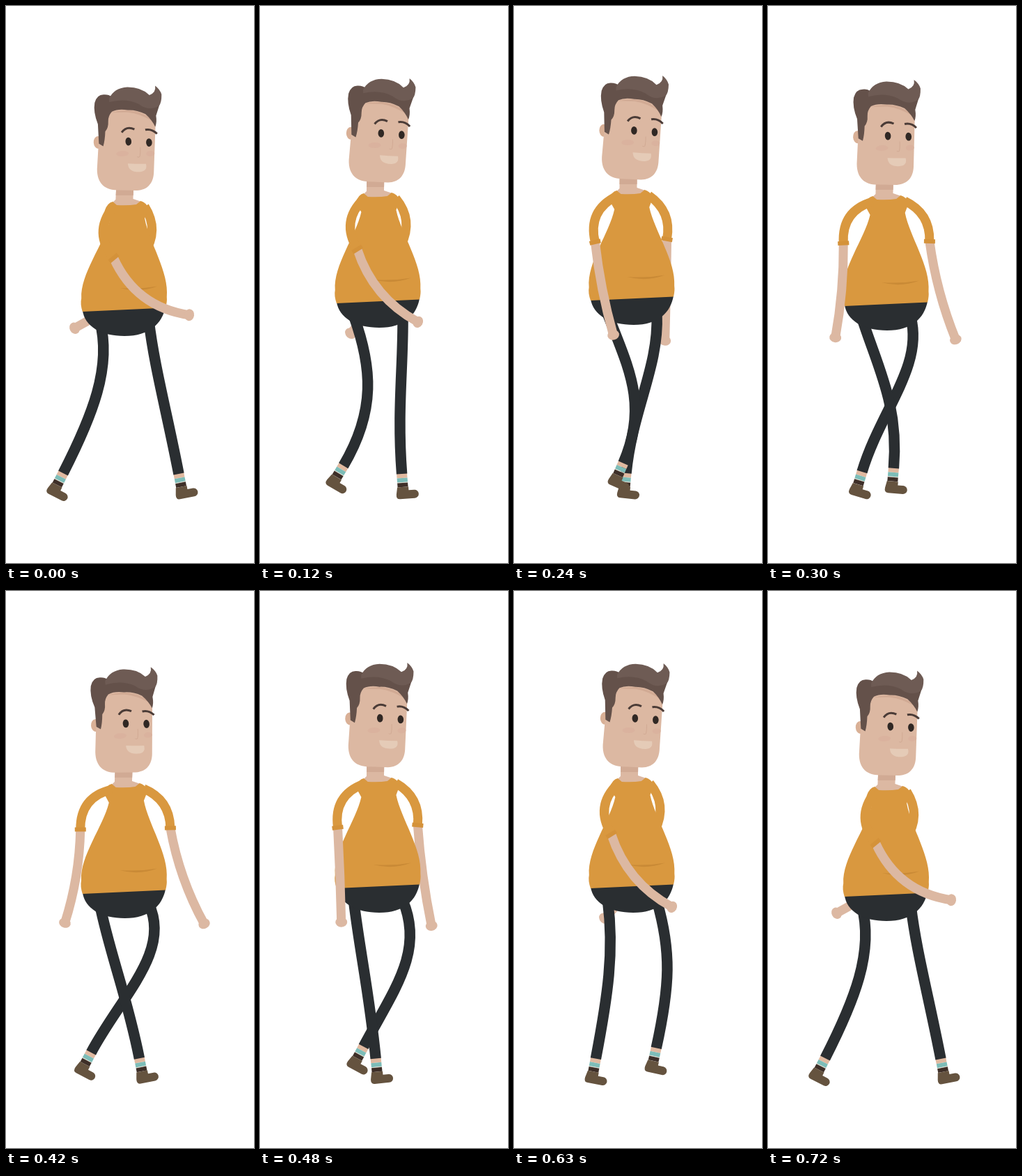
An HTML page with a canvas for the animation above (0.75 s loop, 356 by 800 pixels).

```html
<!DOCTYPE html>
<html lang="en">
<head>
<meta charset="utf-8">
<title>Walk cycle</title>
<style>
html, body { margin: 0; height: 100%; overflow: hidden; background: #fff; }
canvas { display: block; }
</style>
</head>
<body>
<canvas id="stage" width="356" height="800"></canvas>
<script>
const ctx = document.getElementById('stage').getContext('2d');
const LOOP = 750, STEP = 30, BEAT = 180;
const SKIN = '#dcb8a2', SHADE = '#d1aa94', SHIRT = '#d9983f', PANTS = '#2a2e31',
      SHOE = '#65533f', HAIR = '#6e5b54', HAIR_DARK = '#64514a', INK = '#302824';

// Per beat of the walk: ankle x, ankle y, foot angle, knee push
const NEAR_LEG = [[82, 671, 27, 18], [145, 653, 33, 32], [204, 671, -14, 16], [141, 672, 0, 4]];
const FAR_LEG = [[248, 672, -11, 8], [174, 672, 0, -4], [109, 667, 28, 33], [175, 646, 28, 30]];

const rad = degrees => degrees * Math.PI / 180;

function fill(color, d) {
  ctx.fillStyle = color;
  ctx.fill(new Path2D(d));
}

function line(color, width, d) {
  ctx.strokeStyle = color;
  ctx.lineWidth = width;
  ctx.stroke(new Path2D(d));
}

function oval(color, x, y, rx, ry, turn = 0) {
  ctx.fillStyle = color;
  ctx.beginPath();
  ctx.ellipse(x, y, rx, ry, turn, 0, 2 * Math.PI);
  ctx.fill();
}

function placed(x, y, degrees, draw) {
  ctx.save();
  ctx.translate(x, y);
  ctx.rotate(rad(degrees));
  draw();
  ctx.restore();
}

function band(color, top, bottom) {
  ctx.fillStyle = color;
  ctx.fillRect(-7.5, top, 15, bottom - top);
}

function drawFoot() {
  band('#e0b9a0', -1, 6);
  band('#7dbdb8', 6, 12);
  band('#d8d6c8', 12, 13);
  band('#3e2f28', 13, 19);
  fill(SHOE, 'M-8 19H8V24H16A6 6 0 0 1 16 36H-5Q-11 36 -10 29Z');
}

// The shin runs straight up from the foot; the knee push bends the thigh.
function drawLeg(hip, drop, poses, phase) {
  const beat = Math.floor(phase), next = poses[(beat + 1) % 4];
  const [x, y, angle, push] = poses[beat % 4].map((v, i) => v + (next[i] - v) * (phase - beat));
  const shinX = x + 92 * Math.sin(rad(angle)), shinY = y - 92 * Math.cos(rad(angle));
  placed(x, y, angle, drawFoot);
  line(PANTS, 15.5, `M${hip} ${440 + drop * .6}C${hip + push} 518 ${shinX} ${shinY} ${x} ${y}`);
}

// A bowed segment hanging at an angle from a joint
function segment(x, y, length, degrees, bow) {
  const sin = Math.sin(rad(degrees)), cos = Math.cos(rad(degrees));
  const endX = x - length * sin, endY = y + length * cos;
  const bendX = (x + endX) / 2 - bow * cos, bendY = (y + endY) / 2 - bow * sin;
  return {
    endX, endY,
    path: `M${x} ${y}Q${bendX} ${bendY} ${endX} ${endY}`,
    turn: Math.atan2(endY - bendY, endX - bendX),
  };
}

function drawArm(x, y, sleeveLength, sleeveAngle, sleeveBow, armLength, armAngle, armBow) {
  const sleeve = segment(x, y, sleeveLength, sleeveAngle, sleeveBow);
  const arm = segment(sleeve.endX, sleeve.endY, armLength, armAngle, armBow);
  line(SKIN, 13, arm.path);
  oval(SKIN, arm.endX, arm.endY, 7, 8.5, arm.turn);
  line(SHIRT, 13, sleeve.path);
  placed(sleeve.endX, sleeve.endY, sleeve.turn * 180 / Math.PI, () => line('#d4923a', 6, 'M0 -8V8'));
}

function drawTorso() {
  fill(PANTS, 'M110 417L229 412C225 436 208 454 172 454C138 454 114 440 110 417Z');
  fill(SKIN, 'M150 230H175V257L187 261L182 268H150L145 263L150 258Z');
  fill(SHADE, 'M150 230H175V252H150Z');
  fill(SHIRT, 'M146 261L152 266Q168 267 180 265L186 260Q194 262 198 271L193 285' +
    'C201 320 232 362 230 398Q231 405 229 413.5L110 419Q106 408 107.5 400' +
    'C104 365 136 322 143 288L135 274Q138 263 146 261Z');
  fill('#c98a36', 'M162 385Q190 387 216 382.5Q190 392.5 162 385Z');
}

function drawHead() {
  oval('#d9b096', 129, 174, 6.5, 9);
  fill(SKIN, 'M134 135L125.5 212C124 235 138 244 155 244L181 246C197 246 205 236 206.5 222' +
    'L213 148L205 130L150 125Z');
  oval('#dab29e', 163, 192, 9, 4);
  oval('#dab29e', 203, 194, 6, 4);
  fill(SHADE, 'M150 132Q190 124 212 150Q192 136 174 133Z');
  fill(HAIR_DARK, 'M136 180L130 176L130 148Q124 130 127 117Q131 105 141 106Q148 106 152 110L205 118' +
    'L220 124L214 140Q215 150 212 156Q208 146 199 137Q186 130 174 130Q160 127 151 131' +
    'Q145 137 145 145Q145 154 140 159Q139 171 136 180Z');
  fill(HAIR, 'M148 112Q156 97 175 97Q195 98 206 110Q216 107 215 97Q222 103 223.5 110' +
    'Q223 122 219 126Q204 134 190 122Q172 112 148 117Z');
  oval(INK, 172.5, 175, 4.3, 5.9);
  oval(INK, 202, 178, 4.3, 5.9);
  line('#4b3c37', 3, 'M163.5 161.5Q171 152 182 158M197.5 159.5Q207 158 214 166');
  line(SHADE, 1, 'M189 184Q189 193 187.5 197.5Q186 199 184 197.5');
  fill('#e5cbb7', 'M170 206.5Q183 208 196 208.5Q198 219 187 219.5Q170 219.5 170 206.5Z');
}

function draw(time) {
  // Each beat holds its key pose for one step, then moves on evenly.
  const phase = Math.floor(time / BEAT) + Math.max(0, time % BEAT - STEP) / (BEAT - STEP);
  const stride = Math.abs(2 - phase) - 1;
  const swing = Math.cos(phase * Math.PI / 2);
  const drop = 20 * Math.abs(stride);
  const tilt = 1.5 * stride - 4.5 * Math.abs(stride);
  const lean = drop * .36, skew = lean / 153;

  ctx.clearRect(0, 0, 356, 800);
  drawArm(192 + lean, 268 + drop, 68, 18 * swing - 17, -22, 146, 11 + 32 * swing, -7 - 20 * swing);
  drawLeg(205, drop, FAR_LEG, phase);
  drawLeg(134.5, drop, NEAR_LEG, phase);
  ctx.save();
  ctx.transform(1, 0, -skew, 1, skew * 415, drop);
  drawTorso();
  ctx.restore();
  placed(163 + lean, 250 + drop, tilt, () => {
    ctx.translate(-163, -250);
    drawHead();
  });
  drawArm(146 + lean, 269 + drop, 73, 19 - 20 * swing, 29, 136, -21 - 32 * swing, 13 + 24 * swing);
}

const start = performance.now();
function tick() {
  const time = (performance.now() - start) % LOOP;
  draw(Math.floor(time / STEP) * STEP);
  requestAnimationFrame(tick);
}
tick();
</script>
</body>
</html>
```
